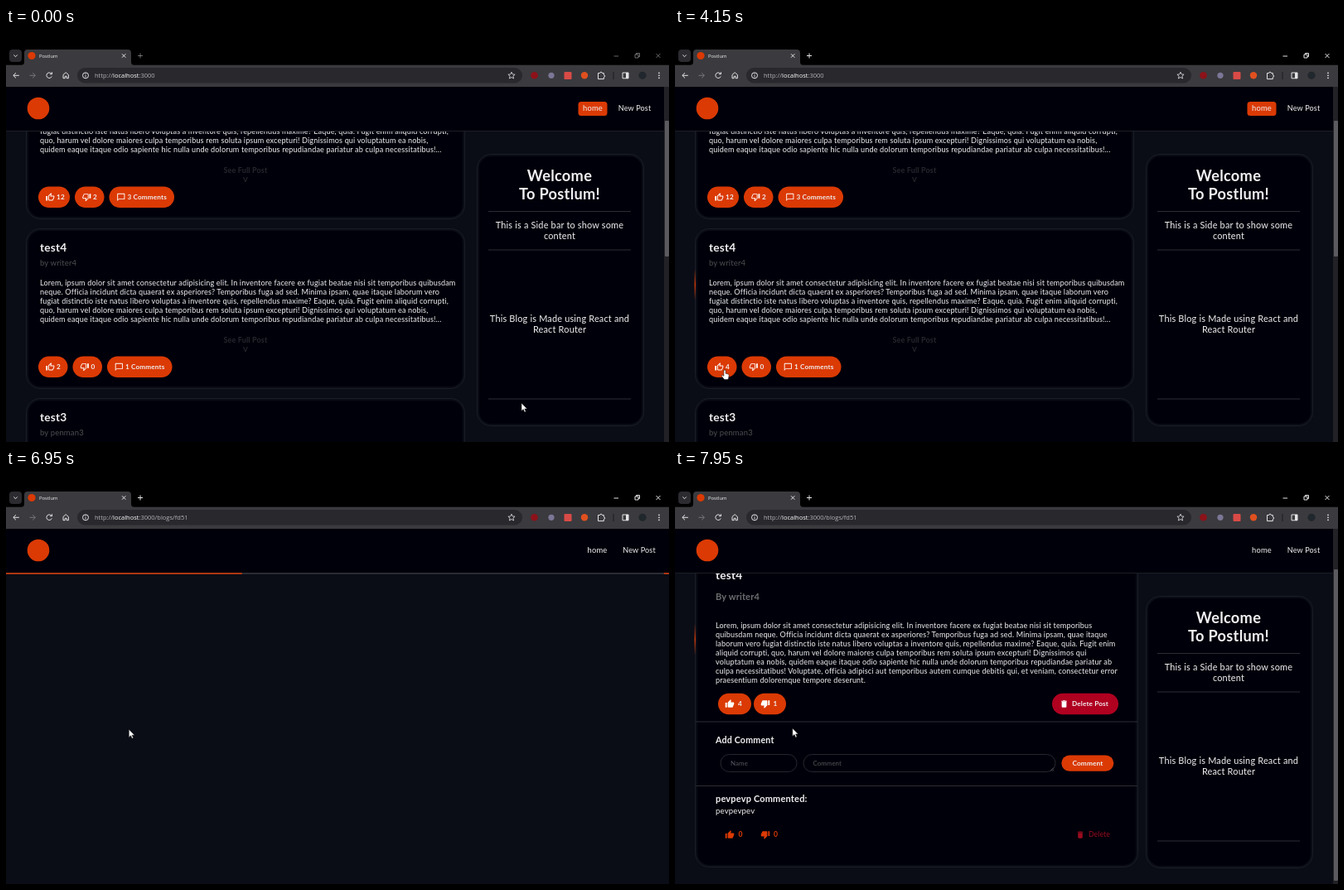
An HTML page for the animation above (8 s loop, 800 by 500 pixels).

```html
<!DOCTYPE html>
<html lang="en">
<head>
<meta charset="utf-8">
<title>Postlum</title>
<style>
  html, body { margin: 0; width: 100%; height: 100%; overflow: hidden; background: #000; }
  svg { display: block; width: 100vw; height: 100vh; }
  text { font-family: Lato, sans-serif; letter-spacing: .016em; fill: #f0f0f2; white-space: pre; }
  .b { font-weight: 700; }
  .m { text-anchor: middle; }
  .ui { font-family: "Open Sans", "Noto Sans", sans-serif; letter-spacing: 0; }
  .line { fill: none; stroke: #e4e4e6; stroke-width: 1; }
</style>
</head>
<body>
<svg id="stage" viewBox="0 0 800 500" preserveAspectRatio="none"></svg>
<script>
const ORANGE = '#db3a04', RED = '#b00020', EDGE = '#1b1e27', INK = '#00000a', PAGE = '#0a0d16', RULE = '#2b2d35';
const LOOP = 8000, FOCUS = 1350, HOVER = 2150, LOAD = 6600, READY = 7350;

const ICON = {
  thumb: 'M9 21h9c.83 0 1.54-.5 1.84-1.22l3.02-7.05c.09-.23.14-.47.14-.73v-2c0-1.1-.9-2-2-2h-6.31l.95-4.57.03-.32c0-.41-.17-.79-.44-1.06L14.17 1 7.58 7.59C7.22 7.95 7 8.45 7 9v10c0 1.1.9 2 2 2zM9 9l4.34-4.34L12 10h9v2l-3 7H9V9zM1 9h4v12H1z',
  solid: 'M1 21h4V9H1zM23 10c0-1.1-.9-2-2-2h-6.31l.95-4.57.03-.32c0-.41-.17-.79-.44-1.06L14.17 1 7.59 7.59C7.22 7.95 7 8.45 7 9v10c0 1.1.9 2 2 2h9c.83 0 1.54-.5 1.84-1.22l3.02-7.05c.09-.23.14-.47.14-.73z',
  chat: 'M20 2H4c-1.1 0-2 .9-2 2v18l4-4h14c1.1 0 2-.9 2-2V4c0-1.1-.9-2-2-2zm0 14H6l-2 2V4h16z',
  bin: 'M6 19c0 1.1.9 2 2 2h8c1.1 0 2-.9 2-2V7H6zM19 4h-3.5l-1-1h-5l-1 1H5v2h14z'
};

// y is the optical middle of the line
const text = (x, y, s, size, cls = '', fill = '') =>
  `<text x="${x}" y="${y + size * .34}" font-size="${size}" class="${cls}"${fill && ` style="fill:${fill}"`}>${s}</text>`;
const rect = (x, y, w, h, fill, r = 0, stroke = 'none') =>
  `<rect x="${x}" y="${y}" width="${w}" height="${h}" rx="${r}" fill="${fill}" stroke="${stroke}"/>`;
const pill = (x, y, w, fill = ORANGE) => rect(x, y - 12.8, w, 25.6, fill, 12.8);
const dot = (x, y, r, fill) => `<circle cx="${x}" cy="${y}" r="${r}" fill="${fill}"/>`;
const line = (d, extra = '') => `<path class="line" d="${d}" ${extra}/>`;
const icon = (name, x, y, size = 11.5, fill = '#fff', turn = 0) =>
  `<path d="${ICON[name]}" fill="${fill}" transform="translate(${x} ${y}) rotate(${turn}) scale(${size / 24}) translate(-12 -12)"/>`;
const group = (id, body, attr = '') => `<g id="${id}" ${attr}>${body}</g>`;
const lines = (x, y, step, rows, size, cls) => rows.map((s, i) => text(x, y + i * step, s, size, cls)).join('');

const frame = (x, y, w, h) =>
  rect(x + .5, y + .5, w - 1, h - 1, '#0a0c15', 17, EDGE) + rect(x + 3, y + 3, w - 6, h - 6, INK, 14.5);
const glow = id => group(id, rect(23.4, -19, 1.6, 38, 'url(#ember)'));

const excerpt = [
  'Lorem, ipsum dolor sit amet consectetur adipisicing elit. In inventore facere ex fugiat beatae nisi sit temporibus quibusdam',
  'neque. Officia incidunt dicta quaerat ex asperiores? Temporibus fuga ad sed. Minima ipsam, quae itaque laborum vero',
  'fugiat distinctio iste natus libero voluptas a inventore quis, repellendus maxime? Eaque, quia. Fugit enim aliquid corrupti,',
  'quo, harum vel dolore maiores culpa temporibus rem soluta ipsum excepturi! Dignissimos qui voluptatum ea nobis,',
  'quidem eaque itaque odio sapiente hic nulla unde dolorum temporibus repudiandae pariatur ab culpa necessitatibus!...'
];
const article = [
  'Lorem, ipsum dolor sit amet consectetur adipisicing elit. In inventore facere ex fugiat beatae nisi sit temporibus',
  'quibusdam neque. Officia incidunt dicta quaerat ex asperiores? Temporibus fuga ad sed. Minima ipsam, quae itaque',
  'laborum vero fugiat distinctio iste natus libero voluptas a inventore quis, repellendus maxime? Eaque, quia. Fugit enim',
  'aliquid corrupti, quo, harum vel dolore maiores culpa temporibus rem soluta ipsum excepturi! Dignissimos qui',
  'voluptatum ea nobis, quidem eaque itaque odio sapiente hic nulla unde dolorum temporibus repudiandae pariatur ab',
  'culpa necessitatibus! Voluptate, officia adipisci aut temporibus autem cumque debitis qui, et veniam, consectetur error',
  'praesentium doloremque tempore deserunt.'
];

function votes(likes, dislikes, comments) {
  const width = n => ({ 12: 38, 1: 34 })[n] || 35.5;
  let x = 39;
  return [[likes, 'thumb', 0, width(likes)], [dislikes, 'thumb', 180, width(dislikes)], [comments + ' Comments', 'chat', 0, 78.5]]
    .map(([label, name, turn, w]) => {
      const s = pill(x, 167.3, w) + icon(name, x + 14.3, 167.3, 11, '#fff', turn) + text(x + 22, 167.3, label, 8.2, 'b');
      x += w + 6;
      return s;
    }).join('');
}

const post = (y, title, author, buttons, extra = '') => `<g transform="translate(0 ${y})">` +
  frame(24, 0, 530, 194) + extra +
  text(41, 23, title, 13.7, 'b') + text(41, 42, 'by ' + author, 9.5, '', '#4d4e53') +
  lines(41, 66, 11.05, excerpt, 9.08) +
  text(289, 135, 'See Full Post', 9, 'b m', '#25272e') + text(289, 146, 'V', 8.4, 'b m', '#25272e') + buttons + '</g>';

const home =
  post(37, 'test5', 'writer5', votes(12, 2, 3)) +
  post(242, 'test4', 'writer4', group('live', ''), glow('homeGlow')) +
  post(447, 'test3', 'penman3', votes(0, 0, 0));

const detail = frame(24, 146, 535, 386) + glow('postGlow') +
  text(49, 179, 'test4', 13.7, 'b') + text(49, 205, 'By writer4', 11, 'b', '#6c6d72') +
  lines(49, 240, 11.05, article, 9.08) +
  pill(52, 334.5, 40) + icon('solid', 66, 334.5) + text(76, 334.5, '4', 8.2, 'b') +
  pill(95, 334.5, 39) + icon('solid', 109, 334.5, 11.5, '#fff', 180) + text(118.5, 334.5, '1', 8.2, 'b') +
  pill(455, 334.5, 80, RED) + icon('bin', 469.5, 334.5) + text(479, 334.5, 'Delete Post', 8.2, 'b') +
  rect(25, 355.5, 533, 1, RULE) + text(49, 378, 'Add Comment', 10.7, 'b') +
  rect(55, 395.5, 92, 21, INK, 10.5, '#25272f') + text(67, 406, 'Name', 7.9, '', '#56575d') +
  rect(155, 395.5, 304, 21, INK, 10.5, '#25272f') + text(166.5, 406, 'Comment', 7.8, '', '#56575d') +
  line('M453 415.5l4-4M455.5 415.5l1.5-1.5', 'style="stroke:#77787d;stroke-width:.7"') +
  rect(466.3, 396.4, 63, 19.4, ORANGE, 9.7) + text(498, 406.2, 'Comment', 8.3, 'b m') +
  rect(25, 433, 533, 1, RULE) + text(49, 449, 'pevpevp Commented:', 11, 'b') + text(49, 464, 'pevpevpev', 9.6) +
  icon('solid', 66, 492.5, 11.5, ORANGE) + text(76.5, 492.5, '0', 8.6, 'b', ORANGE) +
  icon('solid', 109, 492.5, 11.5, ORANGE, 180) + text(119, 492.5, '0', 8.6, 'b', ORANGE) +
  icon('bin', 489, 492.5, 11, '#9c0c1f') + text(499, 492.5, 'Delete', 8.6, '', '#9c0c1f');

const sidebar = frame(568, 152, 202, 329) +
  lines(668, 179, 22, ['Welcome', 'To Postlum!'], 18.2, 'b m') +
  lines(668, 238, 13.5, ['This is a Side bar to show some', 'content'], 10.95, 'm') +
  lines(668, 351, 13.5, ['This Blog is Made using React and', 'React Router'], 10.95, 'm') +
  [221, 267.5, 447.5].map(y => rect(582, y, 172, 1, RULE)).join('');

const header = rect(0, 71, 800, 53, INK) + rect(0, 124, 800, 1, EDGE) + dot(39, 97, 13.3, ORANGE) +
  group('nav', group('active', rect(690.5, 89, 35, 17, ORANGE, 3.5)) +
    text(708, 97.3, 'home', 9.4, 'm') + text(758.5, 97.3, 'New Post', 9.1, 'm'));

const browser = rect(0, 0, 800, 45, '#000') + rect(0, 44.7, 800, 26.3, '#3b3a3e') +
  rect(4, 26, 15, 15, '#2c2b30', 4) + line('M9.3 32.5l2.2 2.2 2.2-2.2') +
  `<path d="M18 45q4 0 4-4V30q0-4 4-4H147q4 0 4 4V41q0 4 4 4Z" fill="#3b3a3e"/>` +
  dot(31, 33.5, 4.6, ORANGE) + text(40, 33.7, 'Postlum', 5.9, 'ui') +
  line('M140 31.3l4.4 4.4M144.4 31.3l-4.4 4.4') +
  group('chrome', line('M162 30.5v6M159 33.5h6M733.5 34h5.5M759 32h4v4h-4zM760.5 32v-1.5h4v4h-1.5M784.5 31l5 5M789.5 31l-5 5')) +
  line('M15.8 57.3H9M12 54.2l-3.2 3.1 3.2 3.1') +
  line('M28.5 57.3h6.8M32.2 54.2l3.2 3.1-3.2 3.1', 'style="stroke:#77767b"') +
  line('M55 55.4a3.3 3.3 0 1 0 .3 3M55.5 53.3v2.4h-2.4') +
  line('M69 56.5l3.2-2.8 3.2 2.8v4.2h-2.2v-2.4h-2v2.4H69z') +
  rect(86, 48, 537, 18.5, '#29282d', 9.2) + line('M92.5 57.3a3.5 3.5 0 1 0 7 0a3.5 3.5 0 1 0-7 0M96 56.8v2.4M96 55v.8') +
  `<text x="107" y="60" font-size="7.5" class="ui" style="fill:#b4b4b8">http://<tspan fill="#fff">localhost</tspan>:3000<tspan id="path"></tspan></text>` +
  line('M610 53.2l1.2 2.7 2.9.3-2.2 1.9.7 2.9-2.6-1.5-2.6 1.5.7-2.9-2.2-1.9 2.9-.3z', 'style="stroke-width:.8"') +
  dot(637.5, 57.3, 4.3, '#8d1219') + dot(658, 57.3, 3.6, '#7b7796') + rect(673.5, 53, 9, 9, '#d94a46', 1) + dot(698, 57.3, 4.2, '#e0501f') +
  line('M714.5 54.5h2.2a1.3 1.3 0 0 1 2.6 0h2v2.3a1.3 1.3 0 0 1 0 2.6v2.2h-6.8z') +
  rect(732.5, 53, 1, 9, '#1d1c20') + line('M744 54h7v6.8h-7z') + rect(748, 54, 3, 7, '#e4e4e6') +
  dot(768, 57.3, 4.6, '#20272d') + [54.3, 57.3, 60.3].map(y => dot(788, y, .9, '#e4e4e6')).join('');

const stage = document.getElementById('stage');
stage.innerHTML = `<defs><linearGradient id="ember" x1="0" y1="0" x2="0" y2="1">
  <stop stop-color="${ORANGE}" stop-opacity="0"/><stop offset=".5" stop-color="${ORANGE}" stop-opacity=".85"/>
  <stop offset="1" stop-color="${ORANGE}" stop-opacity="0"/></linearGradient></defs>` +
  rect(0, 71, 800, 429, PAGE) + group('home', home) + group('detail', detail) + group('side', sidebar) + header +
  group('loading', rect(0, 124.2, 800, 1.5, '#34353a') +
    group('stripe', rect(0, 124.2, 291, 1.5, ORANGE) + rect(-800, 124.2, 291, 1.5, ORANGE))) +
  group('scroll', rect(794, 71, 6, 429, '#222226') + group('thumb', '')) +
  browser +
  group('cursor', `<path id="arrow" d="M0 0V9.6L2.2 7.5 3.8 10.9 5.3 10.2 3.8 6.9H6.8Z"/>
    <path id="hand" d="M-1.1 1a1.1 1.1 0 0 1 2.2 0V4.3l3 .7q1 .3 1 1.4l-.5 3.6q-.3 1.5-1.6 1.5H.2q-1 0-1.5-1L-4 6.9q.8-1.2 1.9-.4l1 .9Z"/>`,
    'fill="#fff" stroke="#111" stroke-width=".5"');

const el = Object.fromEntries([...stage.querySelectorAll('[id]')].map(n => [n.id, n]));
const show = (node, on) => node.style.display = on ? '' : 'none';
const move = (node, x, y) => node.setAttribute('transform', `translate(${x} ${y})`);
const ramp = (t, a, b) => Math.min(1, Math.max(0, (t - a) / (b - a)));
const ease = p => p * p * (3 - 2 * p);

const pointer = [
  [0, 622, 453], [400, 545, 512], [1700, 178, 505], [2500, 60, 413], [4600, 60, 413], [4900, 97, 413],
  [5350, 97, 413], [5600, 148.3, 313.3], [7650, 148.3, 313.3], [7850, 141.8, 312], [LOOP, 141.8, 312]
];
function pointerAt(t) {
  const i = pointer.findIndex((p, k) => k && t <= p[0]);
  const [a, b] = [pointer[i - 1], pointer[i]], p = ease(ramp(t, a[0], b[0]));
  return [a[1] + (b[1] - a[1]) * p, a[2] + (b[2] - a[2]) * p];
}

let shownVotes = '';
function render(t) {
  const onHome = t < LOAD, onPost = t >= READY, loading = !onHome && !onPost;
  show(el.home, onHome);
  show(el.detail, onPost);
  show(el.side, !loading);
  show(el.loading, loading);
  show(el.scroll, !loading);
  show(el.active, onHome);
  move(el.nav, loading ? 5.5 : 0, 0);
  el.path.textContent = onHome ? '' : '/blogs/fd51';
  el.chrome.style.opacity = t < FOCUS ? .45 : 1;

  const counts = [t < 3400 ? 2 : t < 3950 ? 3 : 4, t < 5050 ? 0 : 1, 1];
  if (counts.join() !== shownVotes) {
    shownVotes = counts.join();
    el.live.innerHTML = votes(...counts);
  }

  const lit = ramp(t, HOVER, HOVER + 350);
  el.homeGlow.style.opacity = lit;
  move(el.homeGlow, 0, 96 - 28 * ease(lit));
  move(el.postGlow, 0, 333 - Math.max(0, t - READY) * .127);

  const scrolled = ease(ramp(t, 7650, 7900));
  move(el.detail, 0, -52 * scrolled);
  el.thumb.innerHTML = onHome ? rect(795, 112, 5, 164, '#5b5b5f', 1) : rect(795, 71 + 49 * scrolled, 5, 376, '#5b5b5f', 1);
  move(el.stripe, (((t - 6950) * .8 - 7) % 800 + 800) % 800, 0);

  const [x, y] = pointerAt(t);
  const overButton = onHome && y > 397 && y < 422 && (x > 39 && x < 74 || x > 80 && x < 116);
  move(el.cursor, x, y);
  show(el.hand, overButton);
  show(el.arrow, !overButton);
}

const start = performance.now();
function tick() {
  render((performance.now() - start) % LOOP);
  requestAnimationFrame(tick);
}
tick();
</script>
</body>
</html>
```
